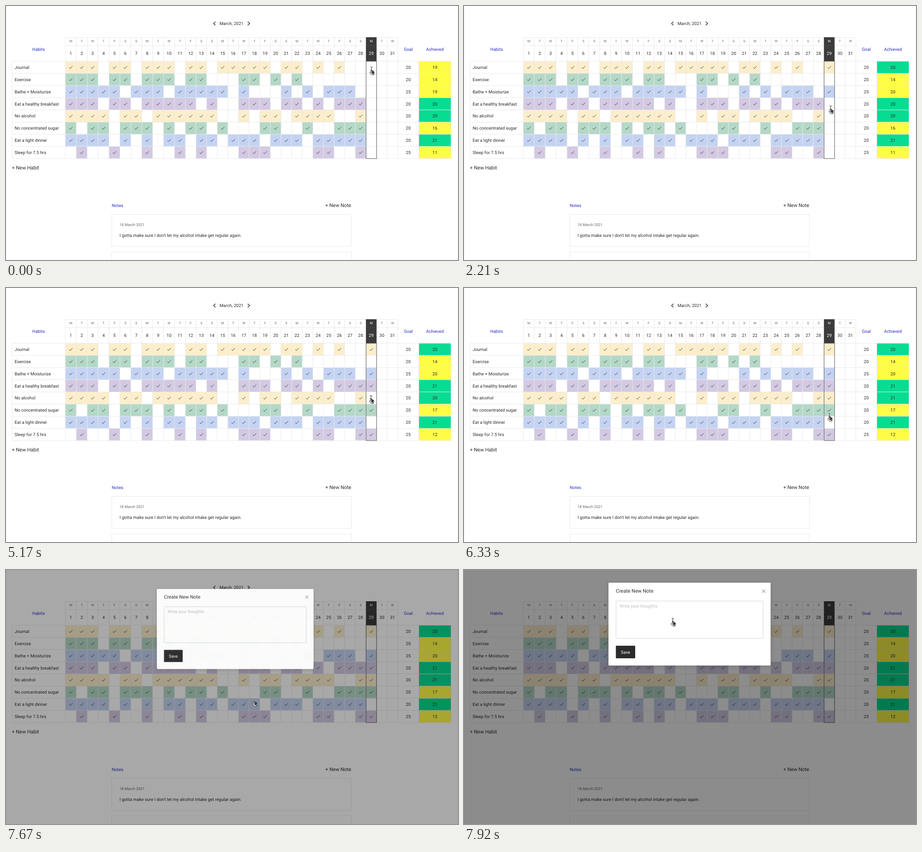
These frames come from a looping animation (998 by 561 pixels, 8 s). An HTML page:

```html
<!DOCTYPE html>
<html lang="en">
<head>
<meta charset="utf-8">
<title>Habit tracker</title>
<style>
html, body { margin: 0; width: 100%; height: 100%; overflow: hidden; background: #fff; }
svg { display: block; width: 998px; height: 561px; }
text { font: 9.64px Roboto, sans-serif; fill: #2b2b2b; text-rendering: geometricPrecision; }
.mid { text-anchor: middle; }
.big { font-size: 11px; }
.date { font-size: 8.26px; fill: #666; }
.wday { font-size: 7.2px; fill: #666; }
.head { fill: #2a30c0; }
.light { fill: #fff; }
.hint { fill: #bfbfbf; }
.line { fill: none; stroke: #e9e9e9; }
.check { fill: none; stroke: #333; stroke-width: .95; }
.chevron { fill: none; stroke: #333; stroke-width: 1.5; }

/* One loop is 8 s, so 1% is 80 ms. */
.tick, .mask, .modal, .cursor, .cursor g { animation: 8s linear infinite; }
.tick { animation-timing-function: step-end; }
.tick0 { animation-name: tick0; }
.tick2 { animation-name: tick2; }
.tick3 { animation-name: tick3; }
.tick4 { animation-name: tick4; }
.tick5 { animation-name: tick5; }
.tick7 { animation-name: tick7; }
@keyframes tick0 { 0% { opacity: 0 } 7.75%, 100% { opacity: 1 } }
@keyframes tick2 { 0% { opacity: 0 } 19.25%, 100% { opacity: 1 } }
@keyframes tick3 { 0% { opacity: 0 } 30.25%, 100% { opacity: 1 } }
@keyframes tick5 { 0% { opacity: 0 } 41%, 100% { opacity: 1 } }
@keyframes tick7 { 0% { opacity: 0 } 56.75%, 100% { opacity: 1 } }
@keyframes tick4 { 0% { opacity: 0 } 73.3%, 100% { opacity: 1 } }

.mask { animation-name: mask; }
@keyframes mask {
  0% { opacity: 0; animation-timing-function: step-end }
  95.875% { opacity: .34 }
  96.6%, 100% { opacity: .45 }
}
.modal { animation-name: modal; transform-origin: 737px 440px; }
@keyframes modal {
  0% { opacity: 0; transform: scale(.966); animation-timing-function: step-end }
  95.875% { opacity: .958; transform: scale(.966); animation-timing-function: ease-out }
  97.75%, 100% { opacity: 1; transform: none }
}

.cursor { animation-name: move; animation-timing-function: ease-in-out; }
@keyframes move {
  0%, .5% { transform: translate(807px, 140px) }
  1.6%, 8.5% { transform: translate(807px, 139px) }
  16.6%, 20.5% { transform: translate(809px, 194px) }
  27.6%, 31% { transform: translate(809.5px, 226px) }
  39.6%, 41.5% { transform: translate(809px, 267px) }
  45.8% { transform: translate(809px, 300px) }
  47.9%, 50% { transform: translate(809px, 302.5px) }
  54.1%, 57.5% { transform: translate(809px, 320px) }
  64.6%, 66.6% { transform: translate(806px, 243px) }
  68.7%, 73.5% { transform: translate(805.5px, 241px) }
  77.1%, 79.1% { transform: translate(807px, 282px) }
  82.2%, 85.3% { transform: translate(798px, 341px) }
  91.6%, 93.75% { transform: translate(742px, 449px) }
  94.7% { transform: translate(736.5px, 435.5px); animation-timing-function: step-end }
  95.875% { transform: translate(549px, 290px); animation-timing-function: ease-out }
  98.4%, 100% { transform: translate(461px, 112px) }
}
.cursor g { animation-timing-function: step-end; }
.hand { animation-name: hand; }
.arrow { animation-name: arrow; }
.beam { animation-name: beam; }
@keyframes hand { 0% { opacity: 1 } 82%, 100% { opacity: 0 } }
@keyframes arrow { 0% { opacity: 0 } 82% { opacity: 1 } 97%, 100% { opacity: 0 } }
@keyframes beam { 0% { opacity: 0 } 97%, 100% { opacity: 1 } }
</style>
</head>
<body>
<svg viewBox="0 0 998 561">
  <rect width="998" height="561" fill="#fff"/>
  <path d="M.5 0V561M997.5 0V561" stroke="#f5f5f5"/>

  <path class="chevron" d="M462.5 34.8L458.3 38.8L462.5 42.8M533.7 34.8L537.9 38.8L533.7 42.8"/>
  <text class="mid" x="498" y="42.2">March, 2021</text>

  <g id="table"></g>
  <text class="big" x="13" y="360.7">+ New Habit</text>

  <text class="head" x="233.5" y="443.6">Notes</text>
  <text class="big" x="705" y="444.2">+ New Note</text>
  <rect class="line" x="233.5" y="460.5" width="529" height="70.5"/>
  <rect class="line" x="233.5" y="543" width="529" height="70"/>
  <text class="date" x="250.7" y="485.5">18 March 2021</text>
  <text x="250.7" y="510.2">I gotta make sure I don't let my alcohol intake get regular again.</text>

  <rect class="mask" width="998" height="561"/>
  <g class="modal">
    <rect x="319" y="28" width="358" height="183" rx="1.4" fill="#fff"
      style="filter: drop-shadow(0 2px 4px rgba(0,0,0,.15))"/>
    <text class="big" x="335.3" y="50.4">Create New Note</text>
    <path d="M658 43L665.4 50.4M665.4 43L658 50.4" stroke="#666"/>
    <rect x="335.7" y="68.5" width="324.6" height="82.3" rx="1" fill="#fff" stroke="#d5d5d5"/>
    <text class="hint" x="343.5" y="83">Write your thoughts</text>
    <rect x="335.3" y="167.3" width="42.7" height="27.6" rx="1" fill="#2b2b2b"/>
    <text class="mid light" x="356.6" y="184.6">Save</text>
  </g>

  <g class="cursor">
    <g class="hand">
      <path fill="#fff" stroke="#222" stroke-width=".9" stroke-linejoin="round"
        d="M-1.5 1C-1.5-.5 .6-.5 .8 1L1.3 4.2C2 3.4 3.2 3.7 3.4 4.6C4.2 4 5.2 4.3 5.3 5.2C6.3 5 6.8 5.6 6.6 6.6L6 9.8L5.4 12H-.2C-1.2 10.5-2.8 9-3.8 7.6C-4.4 6.6-3.2 5.8-2.2 6.6L-.8 7.6Z"/>
      <path d="M1.2 7.5V10M2.8 7.5V10M4.4 7.5V10" stroke="#222" stroke-width=".6"/>
    </g>
    <g class="arrow">
      <path d="M0 0V9.8L2.2 7.8L3.7 11.2L5.2 10.5L3.8 7.2H6.9Z" stroke="#fff" stroke-width=".8" paint-order="stroke"/>
    </g>
    <g class="beam" fill="none">
      <path id="ibeam" d="M-2.3-5.5Q0-5.5 0-4Q0-5.5 2.3-5.5M0-4V4M-2.3 5.5Q0 5.5 0 4Q0 5.5 2.3 5.5M-1.3 1.5H1.3" stroke="#fff" stroke-width="2"/>
      <use href="#ibeam" style="stroke: #222"/>
      <path d="M-2.3-5.5Q0-5.5 0-4Q0-5.5 2.3-5.5M0-4V4M-2.3 5.5Q0 5.5 0 4Q0 5.5 2.3 5.5M-1.3 1.5H1.3" stroke="#222"/>
    </g>
  </g>
</svg>

<script>
const TODAY = 29, DAYS = 31, TOP = 122, ROW = 26.87, BOTTOM = TOP + 8 * ROW;
const LEFT = 13, GOAL = 865, DONE = 911.5, RIGHT = 982.5;
const COLORS = ['#fceecb', '#b4d8c7', '#c4d3f2', '#d3c9e3'];

// name, goal, ticked days, whether today gets ticked
const HABITS = [
  ['Journal', 20, '1-3 5-6 8-10 12-13 15-19 21-22 24 26', true],
  ['Exercise', 20, '1-3 5-6 8-10 12-13 17-18 20 22', false],
  ['Bathe + Moisturize', 25, '1-5 7-9 11-15 17 21 23 25-27', true],
  ['Eat a healthy breakfast', 20, '1-3 5-6 8-12 14 17-19 21-22 24 26-28', true],
  ['No alcohol', 20, '1-4 6-7 9-14 17 19-20 22-25 28', true],
  ['No concentrated sugar', 20, '1 3-4 6-8 10 12-13 15 19-20 23 26-28', true],
  ['Eat a light dinner', 20, '1-4 6 8 10-11 13-14 16-18 20-22 24-28', false],
  ['Sleep for 7.5 hrs', 25, '2 5 8 11 13 17-19 24-25 28', true],
];

// Left edge of a day column; the first eleven are slightly wider.
const edge = day => 131 + 24.1 * Math.min(day - 1, 11) + 23.45 * Math.max(day - 12, 0);
const middle = day => (edge(day) + edge(day + 1)) / 2;

const text = (x, y, value, cls = 'mid') => `<text class="${cls}" x="${x}" y="${y}">${value}</text>`;
const rect = (x, y, w, h, fill) => `<rect x="${x}" y="${y}" width="${w}" height="${h}" fill="${fill}"/>`;

function expand(list) {
  return list.split(' ').flatMap(part => {
    const [from, to = from] = part.split('-').map(Number);
    return Array.from({ length: to - from + 1 }, (_, i) => from + i);
  });
}

function tickCell(day, row) {
  const y = TOP + row * ROW, x = middle(day), cy = y + ROW / 2;
  return rect(edge(day), y, edge(day + 1) - edge(day), ROW, COLORS[row % 4]) +
    `<path class="check" d="M${x - 3.6} ${cy + .4}l2.5 2.4l4.9-5.4"/>`;
}

function achieved(row, count, goal) {
  const y = TOP + row * ROW;
  return rect(DONE, y, RIGHT - DONE, ROW, count >= goal ? '#08dc92' : '#fffc46') +
    text((DONE + RIGHT) / 2, y + 17, count);
}

function habitRow([name, goal, list, today], row) {
  const days = expand(list), base = TOP + row * ROW + 17;
  let out = text(19, base, name, '') + text((GOAL + DONE) / 2, base, goal);
  out += days.map(day => tickCell(day, row)).join('') + achieved(row, days.length, goal);
  if (today) {
    out += `<g class="tick tick${row}">${tickCell(TODAY, row)}${achieved(row, days.length + 1, goal)}</g>`;
  }
  return out;
}

function gridLines() {
  let d = `M131 69.5H${GOAL}M131 87.5H${GOAL}`;
  for (let r = 0; r <= 8; r++) d += `M${LEFT} ${TOP + r * ROW}H${RIGHT}`;
  for (let day = 1; day <= DAYS + 1; day++) d += `M${edge(day)} 69V${BOTTOM}`;
  for (const x of [LEFT + .3, DONE, RIGHT]) d += `M${x} ${TOP}V${BOTTOM}`;
  return `<path class="line" d="${d}"/>`;
}

function header() {
  const x = edge(TODAY), w = edge(TODAY + 1) - x;
  let out = rect(x, 69, w, 53, '#3b3b3b') +
    `<path d="M${x} 87.5h${w}" stroke="#484848"/>` +
    `<rect x="${x + .3}" y="${TOP}" width="${w - .3}" height="${BOTTOM - TOP}" fill="none" stroke="#555"/>`;
  for (let day = 1; day <= DAYS; day++) {
    const light = day === TODAY ? ' light' : '';
    out += text(middle(day), 80.3, 'MTWTFSS'[(day - 1) % 7], 'mid wday' + light) +
      text(middle(day), 108.1, day, 'mid' + light);
  }
  return out + text(72, 98.6, 'Habits', 'mid head') + text(888.3, 98.6, 'Goal', 'mid head') +
    text(947, 98.6, 'Achieved', 'mid head');
}

document.getElementById('table').innerHTML = HABITS.map(habitRow).join('') + gridLines() + header();
</script>
</body>
</html>
```
